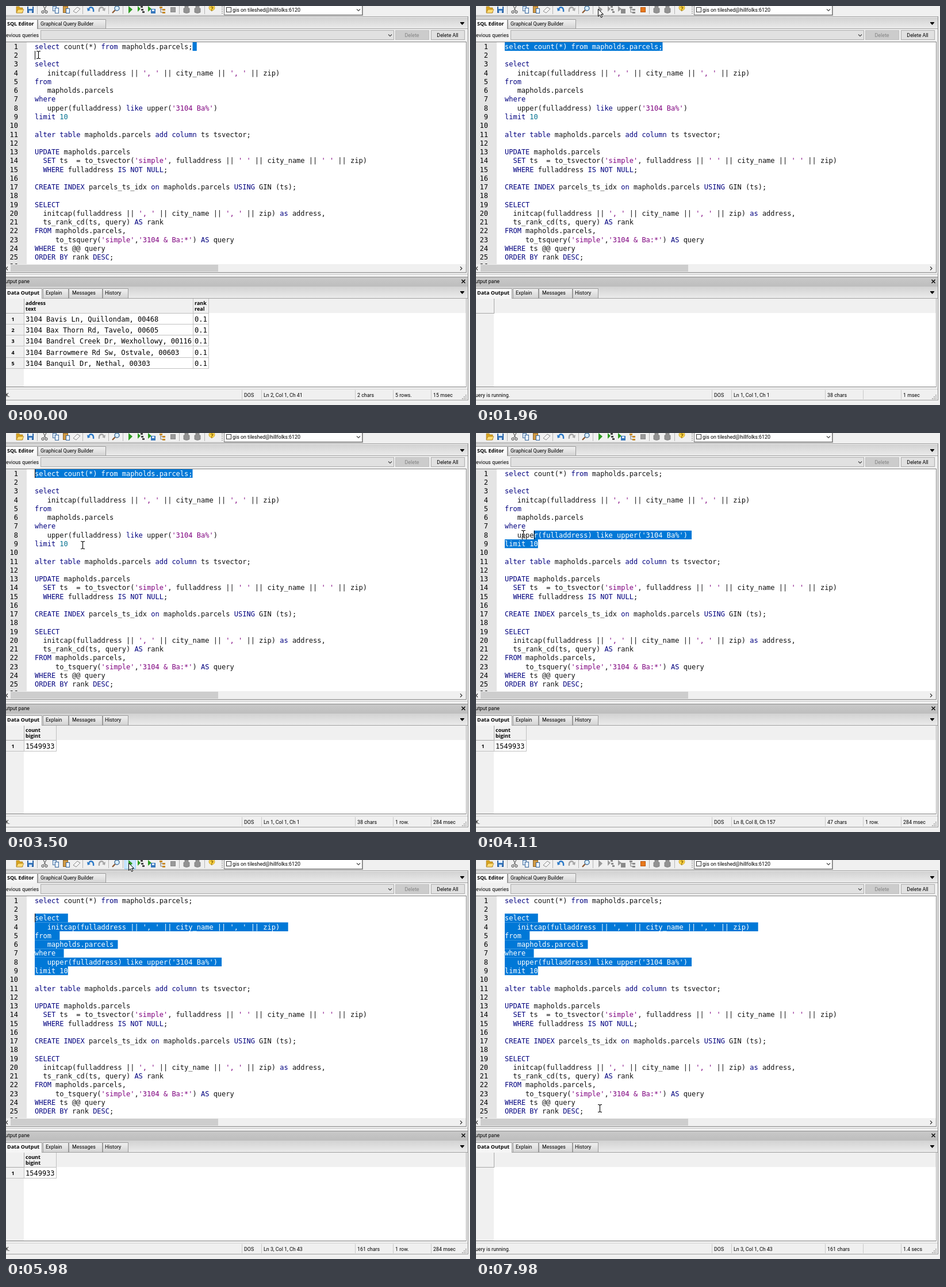
Animation, 807 px wide and 694 px high, one loop 8 s. Source, as an HTML page with a canvas:

```html
<!DOCTYPE html>
<html lang="en">
<head>
<meta charset="utf-8">
<title>SQL editor</title>
<style>
html, body { margin: 0; width: 100%; height: 100%; overflow: hidden; background: #f0f0f0; }
canvas { display: block; }
</style>
</head>
<body>
<canvas id="stage" width="807" height="694"></canvas>
<script>
const g = document.getElementById('stage').getContext('2d');
const LOOP = 8000, CHAR = 7.224, LEFT = 50, TOP = 62.8, PITCH = 15.27;
const MONO = '12px "DejaVu Sans Mono", monospace';
const UI = '8.9px Roboto, sans-serif';
const BOLD = 'bold 9px "Open Sans", sans-serif';

const lines = `select count(*) from mapholds.parcels;

select${' '}
   initcap(fulladdress || ', ' || city_name || ', ' || zip)${' '}
from${' '}
   mapholds.parcels
where${' '}
   upper(fulladdress) like upper('3104 Ba%')
limit 10

alter table mapholds.parcels add column ts tsvector;

UPDATE mapholds.parcels
  SET ts  = to_tsvector('simple', fulladdress || ' ' || city_name || ' ' || zip)
  WHERE fulladdress IS NOT NULL;

CREATE INDEX parcels_ts_idx on mapholds.parcels USING GIN (ts);

SELECT
  initcap(fulladdress || ', ' || city_name || ', ' || zip) as address,
  ts_rank_cd(ts, query) AS rank
FROM mapholds.parcels,
     to_tsquery('simple','3104 & Ba:*') AS query
WHERE ts @@ query
ORDER BY rank DESC;
`.split('\n');
const keywords = /^(select|from|where|like|limit|alter|table|add|column|update|set|is|not|null|create|index|on|using|as|order|by|desc)$/i;

// Offset of each line's first character; line breaks count as two.
const starts = [];
lines.reduce((at, s) => (starts.push(at), at + s.length + 2), 0);
const offset = (line, col) => starts[line - 1] + col - 1;

const addresses = [
  'Bavis Ln, Quillondam, 00468', 'Bax Thorn Rd, Tavelo, 00605',
  'Bandrel Creek Dr, Wexhollowy, 00116', 'Barrowmere Rd Sw, Ostvale, 00603',
  'Banquil Dr, Nethal, 00303'
].map(a => ['3104 ' + a, '0.1']);

// Pointer moves: start, end, number of steps, x, y
const moves = [
  [80, 160, 2, 7, 71], [310, 310, 1, 10, 64], [540, 700, 3, 100, 28],
  [850, 1150, 4, 206, 6], [1400, 1400, 1, 212, 5],
  [2420, 2570, 3, 222, 182], [2645, 2720, 2, 226, 195],
  [2890, 3042, 3, 375, 228], [3118, 3270, 3, 226, 195],
  [3420, 3500, 2, 134, 195], [3810, 3880, 2, 110, 194],
  [4110, 4110, 1, 83, 176], [4188, 4500, 5, 26, 103],
  [4930, 4930, 1, 24, 101], [5030, 5130, 2, 221, 66],
  [5350, 5750, 6, 213, 5], [6280, 6280, 1, 213, 12],
  [6900, 7680, 11, 216, 368], [7910, 7980, 2, 216, 432]
];
// Selection: time, anchor, head
const end1 = offset(1, 39), end9 = offset(9, 9);
const selections = [
  [0, end1, offset(2, 1)], [80, end1, offset(1, 12)], [160, end1, 0],
  [3810, end9, end9], [3880, end9, offset(9, 7)],
  [4110, end9, offset(8, 8)], [4188, end9, offset(7, 4)], [4266, end9, offset(6, 3)],
  [4344, end9, offset(5, 1)], [4422, end9, offset(4, 1)], [4500, end9, offset(3, 1)]
];

const within = (t, ranges) => ranges.some(([a, b]) => t >= a && t < b);

function rect(x, y, w, h, fill, stroke) {
  if (fill) { g.fillStyle = fill; g.fillRect(x, y, w, h); }
  if (stroke) { g.strokeStyle = stroke; g.lineWidth = 1; g.strokeRect(x + .5, y + .5, w - 1, h - 1); }
}
function shade(x, y, w, h, top, bottom) {
  const f = g.createLinearGradient(0, y, 0, y + h);
  f.addColorStop(0, top);
  f.addColorStop(1, bottom);
  rect(x, y, w, h, f);
}
function text(s, x, y, font = UI, color = '#000', align = 'left') {
  g.font = font; g.fillStyle = color; g.textAlign = align;
  g.fillText(s, x, y);
}
function shape(d, fill, stroke, width = 1, x = 0, y = 0) {
  const p = new Path2D(d);
  g.save();
  g.translate(x, y);
  if (fill) { g.fillStyle = fill; g.fill(p); }
  if (stroke) { g.strokeStyle = stroke; g.lineWidth = width; g.stroke(p); }
  g.restore();
}
const chevron = (x, y) => shape('M-3-1.5L0 1.5L3-1.5', 0, '#444', 1.1, x, y);

function icons(running) {
  const run = running ? '#9a9a9a' : '#2f9c22';
  const dim = '#8b8b8b';
  for (const x of [54, 133, 178, 203, 301, 345]) rect(x, 0, 1, 14, '#b4b4b4');
  shape('M18 1h5l1 2h5v9h-11z', '#d9a520', '#a77a17', .7);
  shape('M18 12l3-6h10l-3 6z', '#ffdc74', '#a77a17', .7);
  rect(37, 1, 11, 11, '#3878bd', '#1c4f91');
  rect(39, 1, 7, 4, '#e8f3ff');
  rect(40, 8, 5, 4, '#cfe0f2');
  shape('M65 0l4 8M70 0l-4 8M65.5 9a2 2 0 1 1-3 0a2 2 0 0 1 3 0M71.5 9a2 2 0 1 1-3 0a2 2 0 0 1 3 0', 0, '#666', 1.2);
  rect(81, 0, 7, 9, '#dceaf8', '#48719f');
  rect(85, 3, 7, 10, '#eaf4ff', '#356399');
  rect(99, 0, 9, 12, '#d09a45', '#8b642a');
  rect(104, 4, 7, 9, '#eaf4ff', '#356399');
  shape('M117 9l7-7 5 3-7 7z', '#f4f4f4', '#888', 1);
  shape('M144 5c3-5 9-3 8 5', 0, '#2877c7', 2.4);
  shape('M141 3l1 6 5-2z', '#2877c7');
  shape('M170 5c-3-5-9-3-8 5', 0, '#a4a4a4', 2.4);
  shape('M173 3l-1 6-5-2z', '#a4a4a4');
  shape('M190 7l-5 5', 0, '#8d5932', 2.4);
  shape('M197 4a4 4 0 1 1-8 0a4 4 0 0 1 8 0', '#d6edff', '#38648f', 1.3);
  shape('M213 0l7 6-7 7z', run);
  shape('M229 0l5 5-5 5z', run);
  for (const [x, y] of [[234, 0], [235, 5], [237, 9]]) rect(x, y, 4, 3, running ? dim : '#444');
  shape('M247 0l6 5-6 5z', run);
  rect(252, 5, 8, 8, running ? dim : '#3878bd');
  if (!running) rect(254, 6, 4, 3, '#e8f3ff');
  shape('M267 1h5v3h-5zM272 5h5v3h-5zM272 10h5v3h-5z', running ? dim : '#c88b28');
  shape('M269 4v7h3M269 6h3', 0, '#777');
  rect(286, 2, 9, 9, running ? '#e8791c' : '#9a9a9a', running ? '#b9570d' : '#888');
  for (const x of [314, 333]) {
    shape('M-3 0h6v4h2v7q-5 3-10 0v-7h2z', '#929292', '#7d7d7d', .8, x);
  }
  shape('M363 3a5 5 0 1 1-10 0a5 5 0 0 1 10 0', '#ffd84d', '#c59a1c', .8);
  text('?', 358, 9, 'bold 11px "Open Sans", sans-serif', '#8a6500', 'center');
}

function tabs(y, h, items) {
  shade(0, y, 803, h, '#d2d2d2', '#ececec');
  rect(0, y + h - 1, 803, 1, '#a0a0a0');
  items.forEach(([label, x0, x1, x], i) => {
    shade(x0, y + 3, x1 - x0, h - (i ? 4 : 3), i ? '#f2f2f2' : '#fff', i ? '#d4d4d4' : '#f4f4f4');
    shape(`M${x0 + .5} ${y + h}V${y + 3.5}H${x1 + .5}V${y + h}`, 0, '#9a9a9a');
    text(label, x, y + 14, i ? UI : BOLD);
  });
  shape(`M790 ${y + 9}h7l-3.5 4z`, '#000');
  rect(790, y + 8, 7, 1, '#000');
}

function chrome(t, running) {
  rect(0, 0, 807, 694, '#f0f0f0');
  if (within(t, [[1400, 1960], [5750, 6515]])) rect(206, -1, 20, 17, '#cce8ff', '#99d1ff');
  icons(running);
  rect(0, 16, 621, 1, '#a0a0a0');
  rect(620, 0, 1, 17, '#a0a0a0');
  for (let y = 0; y < 14; y += 3) rect(375, y, 2, 1, '#888');
  rect(379, -2, 241, 18, '#fff', '#7a7a7a');
  rect(383, 2, 9, 9, '#fff', '#333');
  text('gis on tileshed@hillfolks:6120', 394, 10);
  chevron(613, 7);

  tabs(20, 20, [['SQL Editor', -1, 54, 2], ['Graphical Query Builder', 55, 173, 60]]);
  rect(0, 18, 804, 1, '#9d9d9d');
  text('Previous queries', 57, 54, UI, '#000', 'right');
  const hot = within(t, [[620, 700], [2495, 2645], [5350, 5510], [6900, 7060]]);
  rect(60, 42, 615, 17, hot ? '#e5f1fb' : '#e1e1e1', hot ? '#5b9fd4' : '#adadad');
  chevron(668, 51);
  rect(677, 42, 59, 17, '#ccc', '#bfbfbf');
  text('Delete', 706, 54, UI, '#838383', 'center');
  rect(739, 42, 59, 17, '#e1e1e1', '#adadad');
  text('Delete All', 768, 54, UI, '#000', 'center');

  rect(0, 62, 801, 402, '#fff', '#828282');
  rect(0, 63, 36, 386, '#e4e4e4');
  rect(0, 449, 800, 14, '#f0f0f0');
  rect(8, 450, 361, 12, '#cdcdcd');
  shape('M3 453.5l-3 3 3 3M790 453.5l3 3-3 3', 0, '#333', 1.2);
  rect(0, 466, 803, 1, '#c4c4c4');

  shade(0, 471, 803, 17, '#c9c9c9', '#bdbdbd');
  rect(0, 471, 803, 1, '#8e8e8e');
  text('Output pane', 41, 482, UI, '#000', 'right');
  shape('M792.5 476l6 6M798.5 476l-6 6', 0, '#000', 1.4);
  tabs(488, 21, [['Data Output', -1, 62, 2], ['Explain', 64, 108, 69],
    ['Messages', 109, 167, 115], ['History', 168, 212, 172]]);
  rect(0, 534, 800, 128, '#fff');
  rect(0, 534, 31, 128, '#f0f0f0');
  rect(0, 662, 801, 1, '#828282');
  rect(803, 18, 1, 668, '#8c8c8c');
  rect(800, 509, 1, 154, '#a8a8a8');
  rect(0, 666, 803, 1, '#d0d0d0');
  rect(0, 685, 804, 1, '#a0a0a0');
  for (const x of [410, 444, 607, 673, 739]) rect(x, 668, 1, 16, '#c8c8c8');
  for (let i = 0; i < 3; i++)
    for (let j = 0; j <= i; j++) rect(799 - j * 3, 676 + i * 3, 2, 2, '#b0b0b0');
}

function code(t, [since, anchor, head]) {
  const lo = Math.min(anchor, head), hi = Math.max(anchor, head);
  g.save();
  g.beginPath(); g.rect(0, 63, 800, 386); g.clip();
  lines.forEach((s, i) => {
    const top = TOP + i * PITCH, base = Math.round(top + 12), at = starts[i];
    text(i + 1, 21, base, MONO, '#000', 'right');
    const paint = color => {
      for (const m of s.matchAll(/'[^']*'|\w+|[^\s\w']+/g)) {
        const w = m[0];
        const own = w[0] === "'" ? '#7f007f' : /^\d/.test(w) ? '#00708f' : keywords.test(w) ? '#00007f' : '#101010';
        text(w, LEFT + m.index * CHAR, base, MONO, color || own);
      }
    };
    paint();
    const a = Math.max(lo - at, 0), b = Math.min(hi - at, s.length + 1);
    if (b > a && a <= s.length) {
      g.save();
      g.beginPath();
      g.rect(LEFT + a * CHAR, top, (b - a) * CHAR, PITCH);
      g.clip();
      rect(0, top - 1, 800, PITCH + 2, '#0078d7');
      paint('#fff');
      g.restore();
    }
    const col = head - at;
    if (col >= 0 && col <= s.length && t < 6515 && Math.floor((t - since) / 530) % 2 === 0)
      rect(Math.round(LEFT + col * CHAR), top, 1, PITCH, '#000');
  });
  g.restore();
}

function grid(columns, rows) {
  const line = '#c0c0c0';
  rect(31, 509, 1, 26, '#a8a8a8');
  rect(0, 534, 32, 1, '#a8a8a8');
  columns.forEach(([name, type, x0, x1]) => {
    text(name, x0 + 3, 520, BOLD);
    text(type, x0 + 3, 530, BOLD);
    rect(x0, 534, x1 - x0 + 1, 1, line);
    rect(x1, 509, 1, 26, line);
  });
  rows.forEach((row, i) => {
    const y = Math.round(535 + i * 19.2), bottom = Math.round(554 + i * 19.2) - 1;
    text(i + 1, 12, y + 13, BOLD, '#000', 'center');
    rect(0, bottom, 32, 1, line);
    rect(31, y, 1, 19, line);
    columns.forEach(([, , x0, x1], c) => {
      text(row[c], x0 + 3, y + 14, MONO);
      rect(x0, bottom, x1 - x0 + 1, 1, line);
      rect(x1, y, 1, 19, line);
    });
  });
}

function status(t, [, anchor, head], running, rows) {
  const line = starts.findLastIndex(s => s <= head);
  const chars = Math.abs(anchor - head);
  let ms = 15;
  if (t >= 6515) ms = Math.max(0, 208 + 78 * Math.floor((t - 6750) / 78));
  else if (t >= 1960) ms = Math.min(284, Math.round(t - 1960));
  text(running ? 'Query is running.' : 'OK.', running ? 59 : 7, 680, UI, '#000', 'right');
  text('DOS', 414, 680);
  text(`Ln ${line + 1}, Col ${head - starts[line] + 1}, Ch ${head + 1}`, 448, 680);
  if (chars) text(chars + ' chars', 611, 680);
  if (!running) text(rows === 1 ? '1 row.' : rows + ' rows.', 677, 680);
  text(ms < 1000 ? ms + ' msec' : (ms / 1000).toFixed(1) + ' secs', 743, 680);
}

function pointer(t) {
  let x = 57, y = 85;
  for (const [a, b, n, tx, ty] of moves) {
    if (t < a) break;
    const k = n < 2 ? 1 : Math.min(n, 1 + Math.floor((t - a) / (b - a) * (n - 1) + 1e-6)) / n;
    x += (tx - x) * k;
    y += (ty - y) * k;
  }
  x = Math.round(x); y = Math.round(y);
  const dragging = within(t, [[80, 310], [4110, 4930]]);
  const margin = x < 36 && !dragging;
  if (y > 62 && !margin) {
    g.globalCompositeOperation = 'difference';
    shape('M-3-6.5H-1L.5-5.5L2-6.5H4M.5-6V6M-3 6.5H-1L.5 5.5L2 6.5H4', 0, '#fff', 1.1, x - 1, y);
    g.globalCompositeOperation = 'source-over';
    return;
  }
  g.save();
  g.translate(x + .5, y + .5);
  if (margin && y > 62) g.scale(-.85, 1);
  shape('M0 0V12.5L3 9.8L5 14.5L7.2 13.5L5.2 9H9z', '#fff', '#000', 1);
  g.restore();
}

function draw(now) {
  const t = now % LOOP;
  const running = within(t, [[1960, 2260], [6515, LOOP]]);
  const selection = selections.findLast(s => s[0] <= t);
  const first = t < 1960;
  chrome(t, running);
  code(t, selection);
  if (running) grid([], []);
  else if (first) grid([['address', 'text', 31, 325], ['rank', 'real', 325, 352]], addresses);
  else grid([['count', 'bigint', 31, 87]], [['1549933']]);
  status(t, selection, running, first ? addresses.length : 1);
  pointer(t);
}

const begin = performance.now();
function frame() {
  draw(performance.now() - begin);
  requestAnimationFrame(frame);
}
frame();
</script>
</body>
</html>
```
